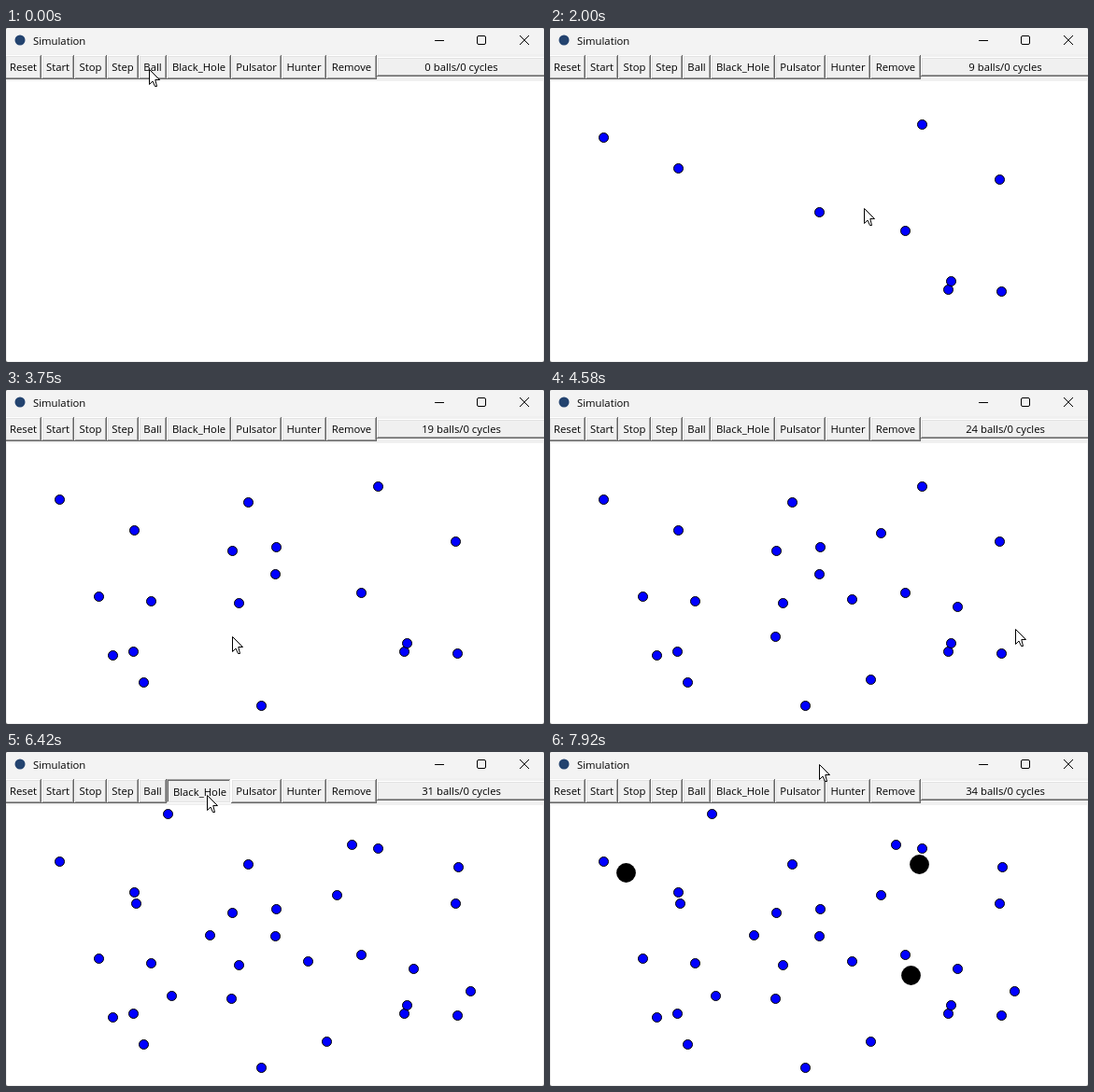
Animation of 576 by 358 pixels, one loop 8 s. Source, as an HTML page:

```html
<!DOCTYPE html>
<html lang="en">
<head>
<meta charset="utf-8">
<title>Simulation</title>
<style>
  html, body { margin: 0; width: 100%; height: 100%; overflow: hidden; background: #555; }
  svg { display: block; width: 576px; height: 358px; border-radius: 2px; }
  text { font: 11.3px "Open Sans", "Noto Sans", sans-serif; fill: #000; }
  .mid { text-anchor: middle; }
  .line { fill: none; stroke: #000; }
  .ball { fill: #00f; stroke: #000; }
  #bar { shape-rendering: crispEdges; }
</style>
</head>
<body>
<svg viewBox="0 0 576 358">
  <rect width="576" height="358" fill="#f0f0f0"/>
  <rect width="576" height="28" fill="#f3f3f3"/>
  <circle cx="15" cy="13" r="5.5" fill="#23436f"/>
  <text x="29" y="18">Simulation</text>
  <path class="line" d="M459 13.5h10M550 8l10 10m0-10l-10 10"/>
  <rect class="line" x="504.5" y="8.5" width="9" height="9" rx="1.5"/>
  <g id="bar"></g>
  <text id="status" class="mid" x="487.5" y="46"></text>
  <rect x="1" y="57" width="574" height="300" fill="#fff"/>
  <g id="arena"></g>
  <path id="cursor" fill="#fff" stroke="#000" d="M.5 .5V16.5L4 13L6.5 18.5H8.5L6.8 11.5H11.5Z"/>
</svg>
<script>
const LOOP = 8000, FPS = 12, LAST = 95;
const $ = id => document.getElementById(id);

function add(parent, tag, attrs) {
  const el = document.createElementNS("http://www.w3.org/2000/svg", tag);
  for (const key in attrs) el.setAttribute(key, attrs[key]);
  parent.append(el);
  return el;
}

// Two-pixel bevel: outer and inner colours for top-left, then bottom-right.
const RAISED = ["#fff", "#e3e3e3", "#696969", "#a0a0a0"];
const SUNKEN = ["#a0a0a0", "#696969", "#fff", "#e3e3e3"];

function bevel(group, l, t, r, b, colours) {
  add(group, "rect", { x: l, y: t, width: r - l, height: b - t, fill: "#f0f0f0" });
  for (const i of [0, 1]) {
    const d = i + 0.5;
    add(group, "path", { class: "line", style: `stroke:${colours[i]}`,
      d: `M${l + d} ${b - i}V${t + d}H${r - i}` });
    add(group, "path", { class: "line", style: `stroke:${colours[i + 2]}`,
      d: `M${l + i} ${b - d}H${r - d}V${t + i}` });
  }
}

function button(name, left, width, down) {
  const group = add($("bar"), "g", {}), shift = down ? 1 : 0;
  bevel(group, left, 29, left + width, 55, down ? SUNKEN : RAISED);
  add(group, "text", { class: "mid", x: left + width / 2 + shift, y: 46 + shift }).textContent = name;
  return group;
}

const widths = { Reset: 39, Start: 35, Stop: 35, Step: 34, Ball: 30,
  Black_Hole: 69, Pulsator: 54, Hunter: 48, Remove: 54 };
const pressed = {};
let left = -1;
for (const [name, width] of Object.entries(widths)) {
  button(name, left, width, false);
  pressed[name] = button(name, left, width, true);
  left += width;
}
bevel($("bar"), left, 31, 580, 52, RAISED);

// Places clicked, in order.
const balls = [
  [57, 117], [137, 150], [288, 197], [398, 103], [481, 162], [483, 282], [426, 280], [429, 271],
  [380, 217], [289, 168], [259, 120], [242, 172], [249, 228], [147, 313], [114, 284], [99, 221],
  [155, 226], [273, 338], [136, 280], [241, 264], [343, 310], [323, 224], [354, 153], [436, 232],
  [497, 256], [484, 123], [370, 99], [218, 196], [177, 261], [139, 162], [173, 66]
];
const holes = [[395, 120], [81, 129], [386, 239]];

// Each series of clicks keeps a steady beat, counted in ticks.
const series = (points, cls, radius, first, beat) => points.map(([x, y], i) => ({
  x, y, tick: first + beat * i,
  el: add($("arena"), "circle", { class: cls, cx: x + 0.5, cy: y + 0.5, r: radius })
}));
const ballClicks = series(balls, "ball", 5, 8, 2);
const holeClicks = series(holes, "hole", 10.4, 81, 5);
const clicks = [...ballClicks, ...holeClicks];

// The cursor reaches each place one tick before the disc appears.
const at = (tick, x, y) => ({ tick, x, y });
const arrive = c => at(c.tick - 1, c.x + 1, c.y);
const path = [
  at(0, 153, 44), at(4, 153, 44), ...ballClicks.map(arrive),
  at(73, 215, 46), at(78, 215, 46), ...holeClicks.map(arrive), at(LAST, 288, 13)
];

function cursorAt(tick) {
  const next = Math.max(1, path.findIndex(p => p.tick >= tick));
  const a = path[next - 1], b = path[next];
  const k = (tick - a.tick) / (b.tick - a.tick);
  return [a.x + (b.x - a.x) * k, a.y + (b.y - a.y) * k].map(Math.round);
}

const show = (el, on) => el.setAttribute("visibility", on ? "visible" : "hidden");

function draw(tick) {
  for (const c of clicks) show(c.el, tick >= c.tick);
  for (const name in pressed) show(pressed[name], false);
  show(pressed.Ball, tick === 2 || tick === 3);
  show(pressed.Black_Hole, tick === 76 || tick === 77);
  const count = clicks.filter(c => tick >= c.tick).length;
  $("status").textContent = `${count} balls/0 cycles`;
  $("cursor").setAttribute("transform", `translate(${cursorAt(tick)})`);
}

const start = performance.now();
let shown = -1;
function frame() {
  const time = (performance.now() - start) % LOOP;
  const tick = Math.min(LAST, Math.floor((time + 5) * FPS / 1000));
  if (tick !== shown) draw(shown = tick);
  requestAnimationFrame(frame);
}
frame();
</script>
</body>
</html>
```
